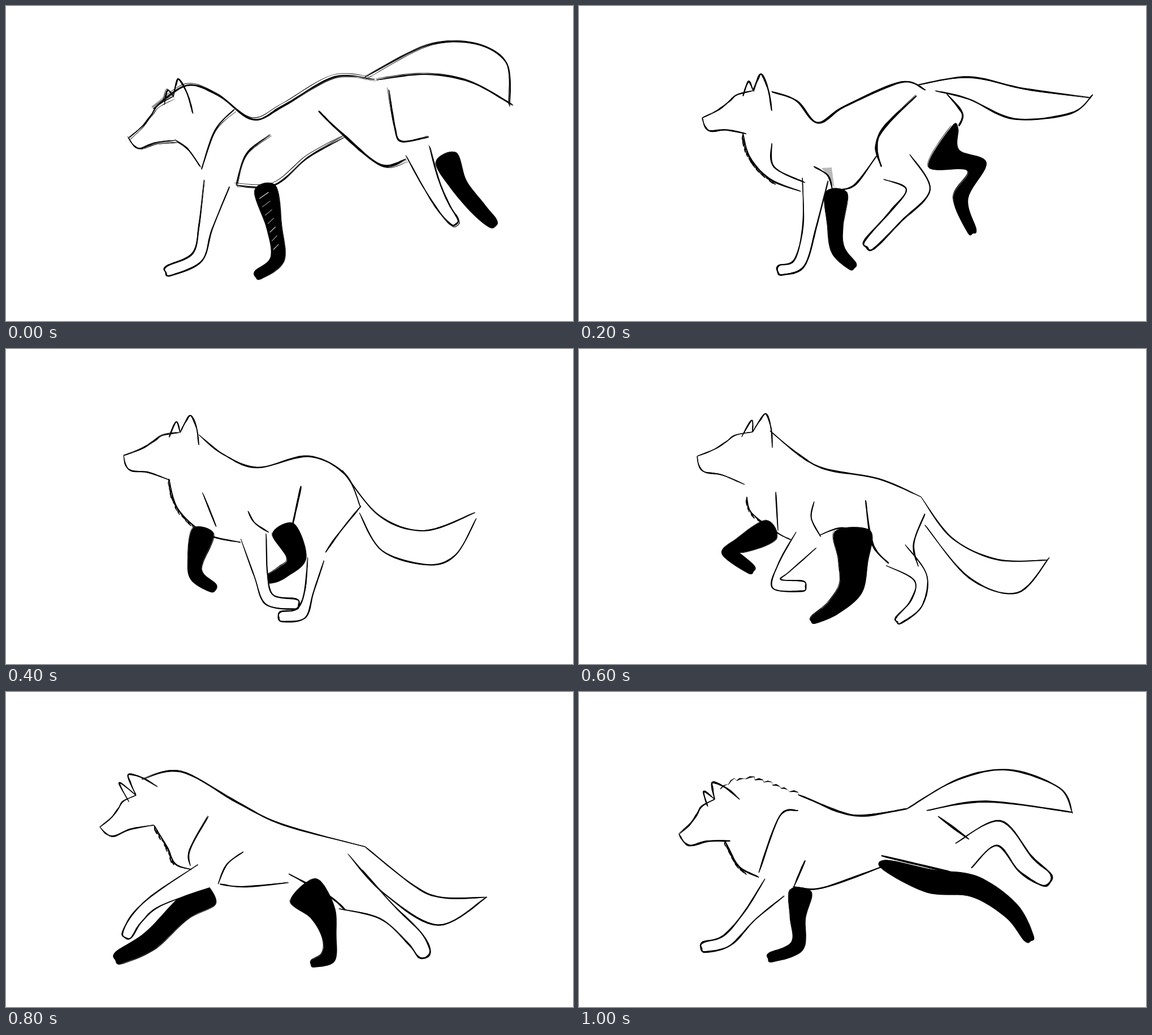
An HTML page that plays this animation: 1003 by 558 pixels, repeating every 1.1 s.

```html
<!DOCTYPE html>
<html lang="en">
<head>
<meta charset="utf-8">
<title>Running wolf</title>
<style>
html, body { margin: 0; width: 100%; height: 100%; overflow: hidden; background: #fff; }
svg { display: block; width: 100%; height: 100%; }
</style>
</head>
<body>
<svg id="stage" viewBox="0 0 1003 558"></svg>
<script>
const STEP = 100, COUNT = 11;
const keys = [];
const lerp = (a, b, t) => a + (b - a) * t;
const mix = (p, q, t) => [lerp(p[0], q[0], t), lerp(p[1], q[1], t)];
const sub = (p, q) => [p[0] - q[0], p[1] - q[1]];

function group(text, size) {
  const v = text.split(' ').map(Number), out = [];
  while (v.length) out.push(v.splice(0, size));
  return out;
}

function maker(seed) {
  return () => (seed = (seed * 16807) % 2147483647) / 2147483647;
}

// Smooth line through points
function spline(p, closed) {
  const n = p.length, last = closed ? n : n - 1, out = [];
  const at = i => closed ? p[(i + n) % n] : p[Math.max(0, Math.min(n - 1, i))];
  for (let i = 0; i < last; i++) {
    const [a, b, c, d] = [at(i - 1), at(i), at(i + 1), at(i + 2)];
    for (let s = 0; s < 10; s++) {
      const t = s / 10, t2 = t * t, t3 = t2 * t;
      out.push([0, 1].map(k => b[k] + (c[k] - a[k]) / 2 * (t3 - 2 * t2 + t)
        + (c[k] - b[k]) * (3 * t2 - 2 * t3) + (d[k] - b[k]) / 2 * (t3 - t2)));
    }
  }
  if (!closed) out.push(p[n - 1]);
  return out;
}

// Evenly spaced points along a polyline
function even(pts, n) {
  const len = [0], out = [];
  for (let i = 1; i < pts.length; i++) len.push(len[i - 1] + Math.hypot(...sub(pts[i], pts[i - 1])));
  for (let k = 0, i = 1; k < n; k++) {
    const d = len[len.length - 1] * k / (n - 1);
    while (i < pts.length - 1 && len[i] < d) i++;
    out.push(mix(pts[i - 1], pts[i], (d - len[i - 1]) / (len[i] - len[i - 1] || 1)));
  }
  return out;
}

// Point at a fraction of a-b, pushed sideways
function beside(a, b, t, off) {
  const [dx, dy] = sub(b, a), d = Math.hypot(dx, dy), [x, y] = mix(a, b, t);
  return [x - dy / d * off, y + dx / d * off];
}

// Outline of a limb from joints [x, y, width]
function limb(joints) {
  const left = [], right = [], n = joints.length - 1;
  joints.forEach(([x, y, w], i) => {
    const [dx, dy] = sub(joints[Math.min(n, i + 1)], joints[Math.max(0, i - 1)]);
    const d = Math.hypot(dx, dy), ox = dy / d * w / 2, oy = dx / d * w / 2;
    left.push([x - ox, y + oy]);
    right.unshift([x + ox, y - oy]);
    if (i === n) left.push([x + dx / d * w / 3, y + dy / d * w / 3]);
  });
  return left.concat(right);
}

function pose(step, { head, fore, farFore, hind, farHind, grey, style, fat = 1, crest = 0, ...lines }) {
  const [nose, base, jaw, tip, heel] = group(head, 2);
  const farBase = mix(base, nose, .2);
  const farTip = tip.map((v, k) => v + 1.3 * (farBase[k] - base[k]));
  const arm = (text, widths) => limb(group(text, 2).map((p, i) => [...p, widths[i]]));
  const parts = {
    brow: [base, beside(base, nose, .28, 7), beside(base, nose, .46, 3), beside(base, nose, .7, -1), nose],
    jaw: [nose, beside(nose, jaw, .12, 13), beside(nose, jaw, .27, 17), beside(nose, jaw, .56, 6), jaw],
    ear: [base, beside(base, tip, .6, -2), tip, beside(tip, heel, .45, -4), heel],
    farEar: [farBase, farTip, base],
    fore: arm(fore, [46, 24, 21, 18]),
    farFore: arm(farFore, [38, 27, 24, 17].map(w => w * fat)),
    hind: limb(group(hind, 3)),
    farHind: limb(group(farHind, 3))
  };
  for (const k in lines) parts[k] = group(lines[k], 2);
  for (const k in parts) parts[k] = spline(parts[k], k.startsWith('far') && k !== 'farEar');
  if (grey) parts.grey = group(grey, 2);
  const [loose, weight, fur] = style;
  keys[step] = { parts, loose, weight, fur, crest };
}

// style: looseness, line weight, number of chest hairs
pose(0, {
  style: [1, .95, 0],
  head: '217 234 296 160 300 238 306 130 331 191',
  spine: '260 182 320 141 375 158 437 201 490 177 580 126 652 130',
  tail: '635 126 745 70 830 67 886 102 891 178',
  under: '655 131 740 121 820 134 897 176',
  rump: '677 148 688 215 700 240 748 232',
  thigh: '553 186 590 222 662 281 708 271',
  belly: '407 318 475 317 535 268 600 232',
  elbow: '468 228 425 262 407 317',
  shoulder: '404 183 370 220 346 290',
  chest: '300 238 322 254 344 285',
  fore: '373 314 353 392 338 445 288 469',
  farFore: '458 322 474 390 480 448 446 476',
  hind: '728 256 45 752 315 30 775 358 22 793 382 16',
  farHind: '778 268 40 802 318 30 838 362 26 862 386 18'
});
pose(1, {
  style: [.9, 1.05, 6],
  head: '213 211 304 152 305 239 318 130 327 190',
  spine: '322 142 385 154 437 201 520 148 600 120',
  tail: '585 124 700 92 800 92 850 112 885 170 915 172',
  under: '642 132 740 142 850 171 912 175',
  rump: '600 120 665 150 682 198',
  thigh: '602 149 548 226 541 264 617 288',
  belly: '540 255 490 311 440 331 412 328',
  elbow: '435 244 412 300 418 330',
  shoulder: '364 223 346 270 353 317 373 322',
  chest: '300 242 318 285 342 308',
  fore: '385 322 389 400 383 455 342 470',
  farFore: '478 322 494 400 503 450 470 474',
  hind: '642 278 54 625 318 22 612 355 20 612 376 16',
  farHind: '680 200 14 682 255 60 728 260 30 752 330 26 790 370 18'
});
pose(2, {
  style: [.6, 1.1, 14],
  head: '218 198 308 150 296 226 323 121 341 186',
  spine: '341 152 385 168 422 207 470 178 570 135 613 149',
  tail: '598 140 690 126 790 147 905 162',
  under: '630 150 690 165 770 200 870 190 909 157',
  rump: '650 155 678 190 672 213',
  thigh: '597 159 540 215 526 250 535 285',
  belly: '527 265 490 315 465 326',
  elbow: '415 284 440 300 448 325',
  shoulder: '341 243 345 285 400 313',
  chest: '290 226 303 270 340 308 392 328',
  fore: '418 307 408 390 390 455 357 468',
  farFore: '455 330 453 390 458 432 483 460',
  hind: '562 285 64 600 325 42 560 373 26 514 422 22',
  farHind: '665 215 12 645 270 62 704 285 36 675 340 26 695 398 16',
  grey: '429 287 447 286 452 324 441 302'
});
pose(4, {
  style: [.4, .9, 14],
  head: '208 189 308 148 290 232 327 118 341 170',
  spine: '341 152 385 187 445 210 535 190 600 222 627 280',
  tail: '595 215 660 295 740 322 830 290',
  under: '625 290 665 357 745 382 795 365 832 300',
  rump: '628 278 590 325 565 360',
  thigh: '522 243 506 316',
  belly: '428 287 440 308 465 325',
  shoulder: '348 255 372 315',
  chest: '288 230 305 285 355 328 415 342',
  fore: '438 332 451 400 466 444 512 452',
  farFore: '349 322 335 375 338 403 366 423',
  hind: '548 372 30 536 430 16 522 468 22 488 474 18',
  farHind: '490 318 42 514 370 34 490 395 22 466 408 16'
});
pose(6, {
  style: [.3, .9, 6],
  head: '209 190 307 147 293 240 331 115 342 175',
  spine: '338 145 390 188 437 213 530 230 605 262',
  tail: '605 262 660 335 740 373 829 374',
  under: '612 312 690 405 775 432 832 369',
  rump: '612 292 592 345 600 385',
  thigh: '507 268 519 345 548 380',
  belly: '425 330 465 317 507 330',
  elbow: '416 270 411 300 428 333',
  shoulder: '348 253 352 322',
  chest: '297 262 305 290 350 325 375 338',
  fore: '402 338 362 388 350 416 395 420',
  farFore: '340 320 285 348 264 358 304 390',
  hind: '560 365 50 604 405 24 597 450 22 566 480 14',
  farHind: '484 322 62 485 375 52 480 425 42 448 460 26 415 480 14'
});
pose(8, {
  style: [.45, .95, 9], fat: 1.4,
  head: '166 239 230 183 262 236 217 146 268 168',
  spine: '240 155 310 141 410 196 490 235 635 274',
  tail: '635 274 720 342 770 364 850 364',
  under: '605 287 670 358 765 413 851 363',
  thigh: '500 322 572 362 600 386',
  belly: '378 340 420 345 500 338',
  elbow: '420 283 391 305 375 340',
  shoulder: '358 220 325 280 326 308',
  chest: '262 236 285 275 300 305 328 314',
  fore: '350 326 268 368 232 400 214 430',
  farFore: '355 352 308 388 255 440 200 470',
  hind: '610 350 80 672 388 34 722 435 30 740 463 24',
  farHind: '525 350 60 560 390 46 572 435 24 570 470 26 544 481 14'
});
pose(10, {
  style: [.4, 1.15, 10], crest: 1,
  head: '177 252 240 190 268 264 237 160 284 190',
  spine: '250 172 300 154 390 183 460 212 505 219 580 207',
  tail: '580 207 670 155 760 138 850 170 873 215',
  under: '615 210 720 194 873 213',
  rump: '635 220 690 261',
  thigh: '535 290 660 320',
  belly: '378 345 430 347 540 308',
  elbow: '400 298 380 345',
  shoulder: '388 210 355 220 318 320',
  chest: '258 263 282 308 318 328',
  fore: '346 346 303 395 262 440 222 452',
  farFore: '392 352 387 400 386 450 340 470',
  hind: '680 290 52 742 250 44 790 305 34 826 332 26',
  farHind: '540 306 18 620 335 42 700 345 38 765 388 30 796 436 18'
});

function between(a, b) {
  const out = { parts: {}, crest: 0 };
  for (const k of ['loose', 'weight', 'fur']) out[k] = (a[k] + b[k]) / 2;
  for (const k in a.parts) {
    if (!b.parts[k]) continue;
    const q = even(b.parts[k], 80);
    out.parts[k] = even(a.parts[k], 80).map((p, i) => mix(p, q[i], .5));
  }
  return out;
}

const outline = pts => 'M' + pts.map(p => p.map(v => v.toFixed(1)).join(' ')).join('L') + 'Z';
const shape = (pts, fill) => `<path d="${outline(pts)}" fill="${fill}"/>`;

// Tapered ribbon with uneven pressure
function brush(pts, width, rand, fill = '#000') {
  const n = pts.length - 1, left = [], right = [], phase = rand() * 6;
  pts.forEach(([x, y], i) => {
    const [dx, dy] = sub(pts[Math.min(n, i + 1)], pts[Math.max(0, i - 1)]);
    const d = Math.hypot(dx, dy) || 1, taper = .4 + .6 * Math.sqrt(Math.abs(Math.sin(Math.PI * i / n)));
    const w = width / 2 * taper * (1 + .2 * Math.sin(i * .55 + phase) + .2 * (rand() - .5));
    left.push([x - dy / d * w, y + dx / d * w]);
    right.unshift([x + dy / d * w, y - dx / d * w]);
  });
  return shape(left.concat(right), fill);
}

function drift(pts, size, rand) {
  const from = rand() - .5, to = rand() - .5;
  return pts.map(([x, y], i) => {
    const o = size * lerp(from, to, i / pts.length);
    return [x + o, y + o * 1.4];
  });
}

// Zigzag of fur along a line
function hairs(pts, n, side, rand) {
  const line = even(pts, n + 1);
  let out = '';
  for (let i = 0; i < n; i++) {
    const a = line[i], b = line[i + 1], d = Math.hypot(...sub(b, a));
    const tip = beside(a, b, (10 + 6 * rand()) / d, side * (1 + 3 * rand()));
    out += brush([a, beside(a, tip, .5, side), tip], 2.6, rand) + brush([tip, b], 1.3, rand);
  }
  return out;
}

const WIDTH = {
  brow: 2.4, jaw: 2.6, ear: 2.9, farEar: 2.5, spine: 3.3, tail: 2.8, under: 2.9, rump: 3,
  thigh: 4, belly: 2.7, elbow: 2.4, shoulder: 2.6, chest: 2.6, fore: 2.7, hind: 3
};

function draw({ parts, loose, weight, fur, crest }, seed) {
  const rand = maker(seed * 977 + 31);
  let out = parts.grey ? shape(parts.grey, '#b9b9b9') : '';
  for (const k of ['farHind', 'farFore']) out += shape(parts[k], '#000') + brush(drift(parts[k], 2, rand), 1.4, rand);
  for (const k of ['hind', 'fore']) out += shape(parts[k], '#fff');
  for (const k in WIDTH) {
    let p = parts[k];
    if (!p) continue;
    if (crest && k === 'spine') {
      p = even(p, 60);
      out += hairs(p.slice(0, 26), 9, -1.5, rand);
      p = p.slice(25);
    }
    out += brush(p, WIDTH[k] * weight, rand) + brush(drift(p, 5 * loose, rand), 1.2, rand);
    if (loose > .8) out += brush(drift(p, 7, rand), 1, rand);
  }
  if (fur) out += hairs(even(parts.chest, 60).slice(0, 42), Math.round(fur), 1, rand);
  if (loose === 1) {
    const p = even(parts.farFore, 80);
    for (let i = 3; i < 24; i += 3) out += brush([mix(p[i], p[70 - i], .15), mix(p[i - 2], p[72 - i], .6)], 2, rand, '#fff');
  }
  return out;
}

const stage = document.getElementById('stage');
stage.innerHTML = Array.from({ length: COUNT }, (_, i) =>
  `<g display="none">${draw(keys[i] || between(keys[i - 1], keys[i + 1]), i + 1)}</g>`).join('');
const frames = [...stage.children];
const start = performance.now();
let shown = -1;

function render(ms) {
  const i = Math.floor(Math.max(0, ms) / STEP) % COUNT;
  if (i === shown) return;
  frames.forEach((g, k) => g.setAttribute('display', k === i ? 'inline' : 'none'));
  shown = i;
}

function tick() {
  render(performance.now() - start);
  requestAnimationFrame(tick);
}
tick();
</script>
</body>
</html>
```
